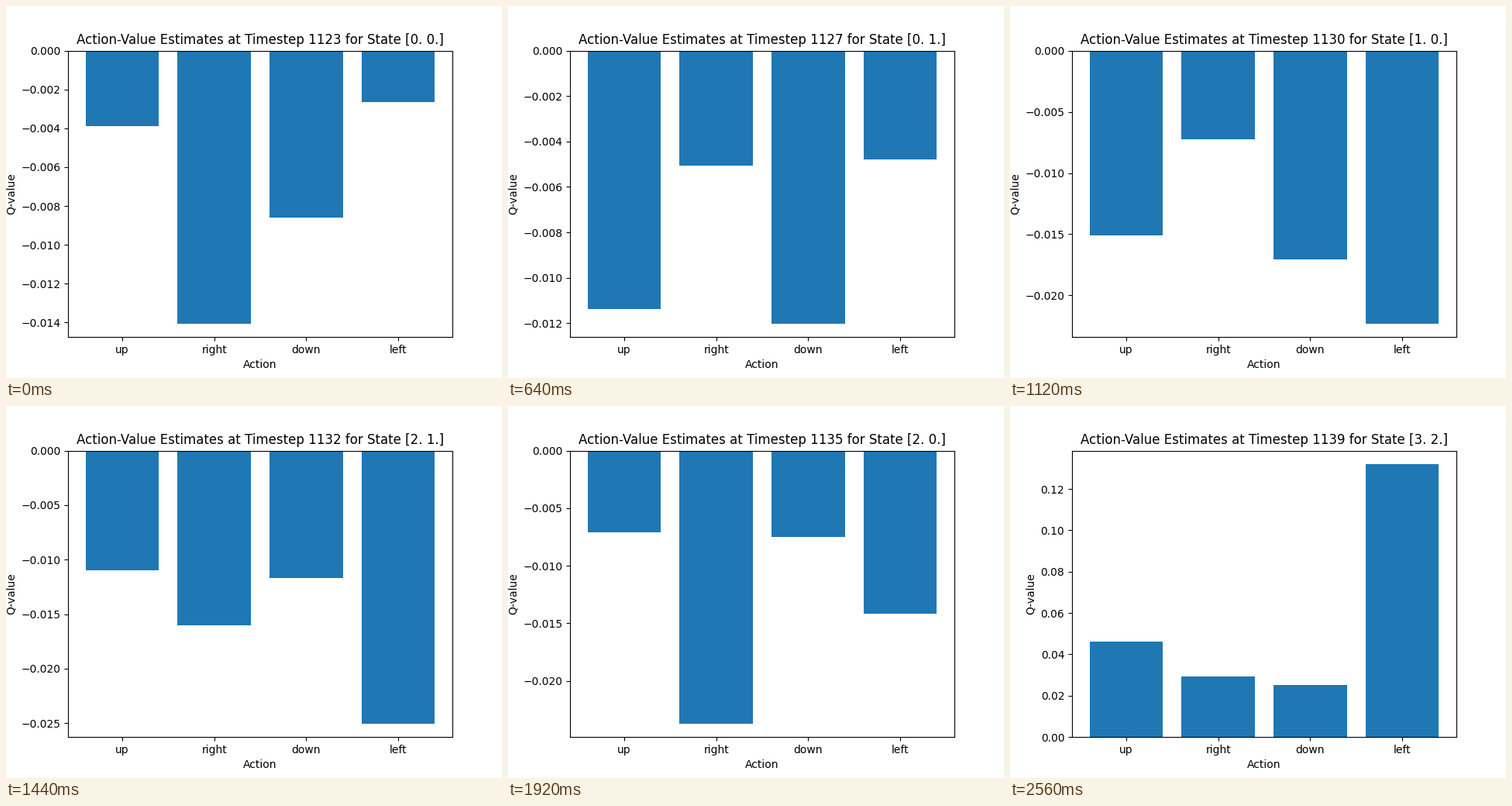
Recreate the animation shown at these times as a matplotlib script. Size 640 by 480 pixels, loop 2720 ms.

```python
import matplotlib.pyplot as plt
import numpy as np
from matplotlib.animation import FuncAnimation

ACTIONS = ["up", "right", "down", "left"]
MOVES = {"U": (0, 1), "D": (0, -1), "R": (1, 0), ".": (0, 0)}
WALK = "UU.DR.DUR.D.R.UU"
FIRST_STEP = 1123

# Key Q-values in thousandths, by steps walked.
KEYS = {
    0: (-3.89, -14.05, -8.61, -2.65),
    1: (-7.2, -19.01, -11.8, -5.6),
    2: (-8, -15.18, -11.96, -7.78),
    4: (-11.38, -5.06, -12.01, -4.79),
    5: (-13.8, -7, -15.9, -27.1),
    7: (-15.1, -7.25, -17.06, -22.29),
    10: (-10.8, -16.4, -11.5, -25.14),
    11: (-7.66, -22.98, -7.21, -15.1),
    14: (14.76, -52.7, -19.15, 23.26),
    16: (46.25, 29.3, 25.2, 131.94),
}


def ease(u):
    """Steep S-curve that lags slightly at the middle."""
    return u**5 / (u**5 + 1.25 * (1 - u)**5)


def q_values(i):
    lo = max(k for k in KEYS if k <= i)
    hi = min(k for k in KEYS if k >= i)
    a, b = np.array(KEYS[lo]), np.array(KEYS[hi])
    u = (i - lo) / max(hi - lo, 1)
    return (a + (b - a) * ease(u)) / 1000


def state(i):
    return np.sum([(0, 0)] + [MOVES[m] for m in WALK[:i]], axis=0, dtype=float)


fig, ax = plt.subplots(figsize=(6.4, 4.8), dpi=100)


def draw(i):
    ax.clear()
    ax.bar(ACTIONS, q_values(i))
    ax.set_xlabel("Action")
    ax.set_ylabel("Q-value")
    ax.set_title(f"Action-Value Estimates at Timestep {FIRST_STEP + i} "
                 f"for State {state(i)}")
    return ax.patches


anim = FuncAnimation(fig, draw, frames=len(WALK) + 1, interval=160,
                     init_func=lambda: draw(0), repeat=True, repeat_delay=0)
plt.show()
```
